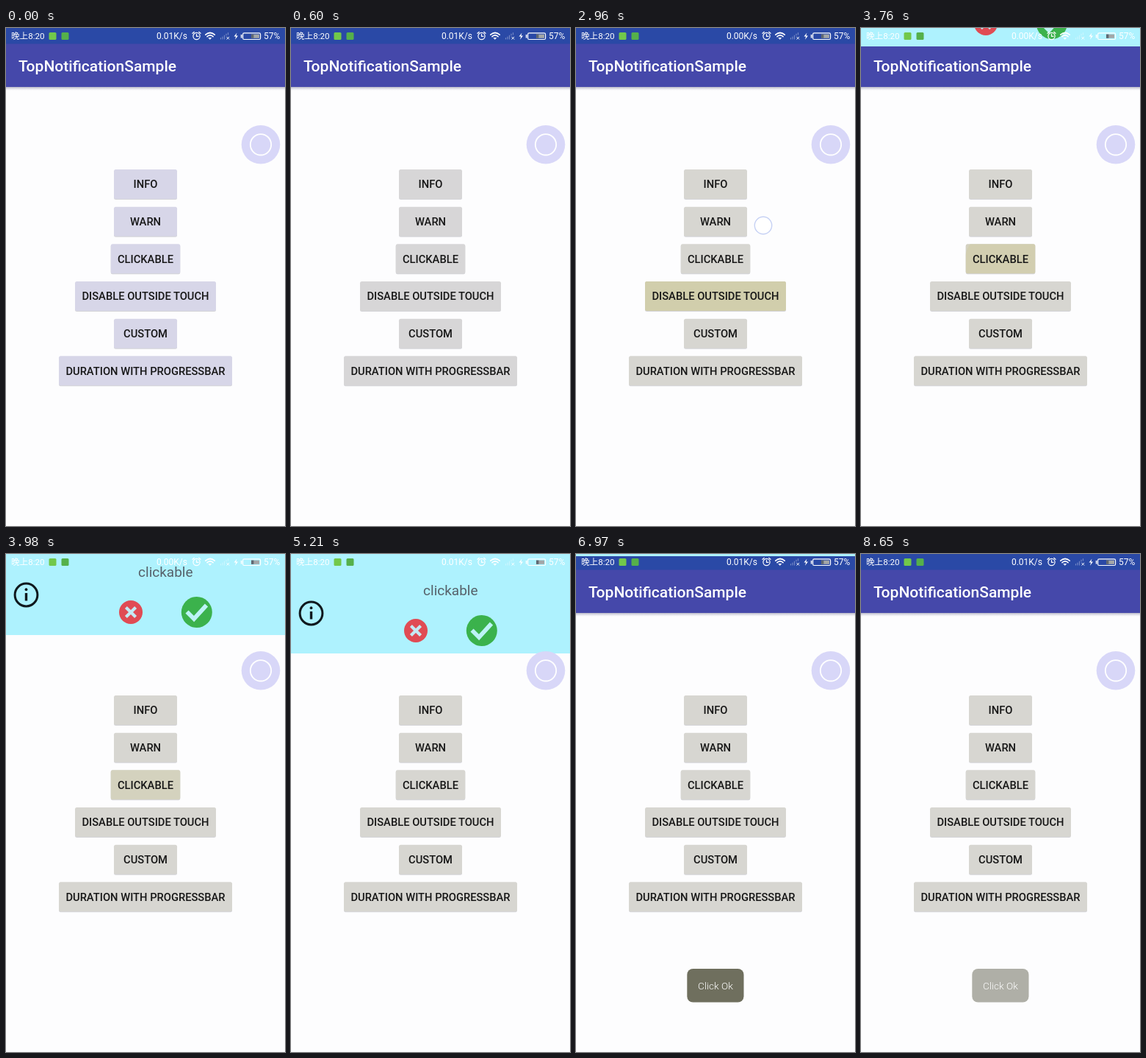
Recreate the animation shown at these times as an HTML page. Size 380 by 676 pixels, loop 8680 ms.

```html
<!DOCTYPE html>
<html lang="en">
<head>
<meta charset="utf-8">
<title>Top notification demo</title>
<style>
  html, body { margin: 0; width: 100%; height: 100%; overflow: hidden; background: #fdfdfe; }
  svg { display: block; width: 380px; height: 676px; font-family: Roboto, "Noto Sans CJK SC", "Noto Sans CJK", sans-serif; }
  .title { font-size: 21px; font-weight: 500; fill: #fff; }
  .label { font-size: 14.72px; font-weight: 500; fill: #161616; text-anchor: middle; }
  .status { font-size: 12px; fill: #fff; }
  .line { fill: none; stroke-linecap: round; stroke-linejoin: round; }
  .mark { fill: none; }
</style>
</head>
<body>
<svg viewBox="0 0 380 676">
  <defs>
    <linearGradient id="shade" x1="0" y1="0" x2="0" y2="1">
      <stop offset="0" stop-color="#8f8fa8" stop-opacity=".65"/>
      <stop offset="1" stop-color="#c8c8d8" stop-opacity="0"/>
    </linearGradient>
  </defs>

  <rect width="380" height="676" fill="#fdfdfe"/>
  <rect y="80" width="380" height="5" fill="url(#shade)"/>
  <rect width="380" height="80" fill="#4548aa"/>
  <rect width="380" height="21.5" fill="#2a49a6"/>
  <text class="title" x="17" y="58.5">TopNotificationSample</text>

  <g id="buttons"></g>

  <g id="banner">
    <rect width="380" height="135" fill="#aef2fe"/>
    <text x="217.3" y="56" font-size="19" fill="#56616a" text-anchor="middle">clickable</text>
    <g stroke="#10191e" fill="#10191e">
      <circle cx="27.5" cy="80.5" r="15.4" fill="none" stroke-width="3"/>
      <circle cx="27.5" cy="73.2" r="1.9" stroke="none"/>
      <path d="M27.5 78V88.5" stroke-width="3.4"/>
    </g>
    <circle cx="170" cy="104" r="16" fill="#e04b54"/>
    <path class="mark" d="M163.4 97.4l13.2 13.2m0-13.2l-13.2 13.2" stroke="#c4eaf4" stroke-width="4.2"/>
    <circle cx="259.8" cy="104" r="21" fill="#3bb24c"/>
    <path class="mark" d="M246.5 103.5l9.5 9.5l17-18.5" stroke="#bdf3f6" stroke-width="5.8"/>
  </g>

  <g class="status">
    <text x="7" y="15" font-size="11.6">晚上8:20</text>
    <rect x="58.5" y="6" width="10" height="10" rx="1.5" fill="#72c84a"/>
    <rect x="75.5" y="6" width="10" height="10" rx="1.5" fill="#55b04a"/>
    <text id="speed" x="247" y="15" text-anchor="end"></text>
    <g class="line" stroke="#fff" stroke-width="1.2">
      <circle cx="259.5" cy="11" r="4.6"/>
      <path d="M259.5 8.3V11.3H262M254 7.3l2.3-2M265 7.3l-2.3-2"/>
      <path d="M271.8 9.2Q278 3.8 284.2 9.2M274 11.6Q278 8.2 282 11.6" stroke-width="1.7"/>
      <path d="M276.3 13.4H279.7L278 15.2Z" fill="#fff" stroke-width=".8"/>
      <path d="M292.5 15V13.5M295 15V12M297.5 15V10M300 10V8M302.5 9V6.5" opacity=".35"/>
      <path d="M300.8 12.2l3 3m0-3l-3 3" stroke-width="1"/>
      <path d="M314.5 6.5l-4 5h2.7l-1.2 4.3l4-5.2h-2.7z" fill="#fff" stroke="none"/>
      <rect x="322.6" y="6.9" width="24" height="8.6" rx="1.8"/>
      <path d="M320.6 9.5V13" stroke-width="1.6"/>
    </g>
    <rect x="334" y="8.6" width="11" height="5.2" fill="#a3a7a8"/>
    <rect x="334" y="8.6" width="3.4" height="5.2" fill="#5f6872"/>
    <text x="351" y="15">57%</text>
  </g>

  <circle cx="347" cy="158.3" r="26.3" fill="#d8d7f8"/>
  <circle cx="347" cy="158.3" r="14.2" fill="none" stroke="#fff" stroke-width="1.8"/>

  <g id="toast">
    <rect x="151.3" y="563" width="77.2" height="45.5" rx="8" fill="#6f6f5e"/>
    <text x="190" y="591" font-size="13.6" font-weight="300" fill="#fff" text-anchor="middle">Click Ok</text>
  </g>

  <circle id="touch" r="11.7" fill="#fff" fill-opacity=".72" stroke="#c6d1f4" stroke-width="1.4"/>
</svg>

<script>
const LOOP = 8680;
const $ = id => document.getElementById(id);

// label, width
const BUTTONS = [
  ["INFO", 86], ["WARN", 86], ["CLICKABLE", 94.5],
  ["DISABLE OUTSIDE TOUCH", 192], ["CUSTOM", 86], ["DURATION WITH PROGRESSBAR", 236]
];

const box = (x, y, w, extra) =>
  `<rect x="${x}" y="${y}" width="${w}" height="40" rx="2.5" ${extra}/>`;

$("buttons").innerHTML = BUTTONS.map(([label, w], i) => {
  const x = 190 - w / 2, y = 192 + i * 50.67;
  return `<clipPath id="clip${i}">${box(x, y, w, "")}</clipPath>
    ${box(x, y + 1, w, 'fill="#b9b9c0" opacity=".6"')}
    ${box(x, y, w, "")}
    <g id="press${i}" clip-path="url(#clip${i})" opacity="0" fill="#d1ceac">
      ${box(x, y, w, 'opacity=".5"')}<circle/></g>
    <text class="label" x="190" y="${y + 25.4}">${label}</text>`;
}).join("");

// button index (or -1), down, up, fade length, start point, end point
const TAPS = [
  { button: 3, down: 2130, up: 3015, fade: 220, from: [202.3, 366.5], to: [255, 268] },
  { button: 2, down: 3440, up: 3560, fade: 590, from: [199, 325], to: [199, 325] },
  { button: -1, down: 6290, up: 6410, fade: 0, from: [262, 106], to: [262, 106] }
];

const part = (t, start, length) => Math.min(1, Math.max(0, (t - start) / length));
const ease = p => (1 - Math.cos(Math.PI * p)) / 2;
const mix = (a, b, p) => a + (b - a) * p;

function drawTaps(t) {
  let shown = false;
  for (const { button, down, up, fade, from, to } of TAPS) {
    if (t >= down && t < up) {
      const p = ease(part(t, down + 60, up - down - 120));
      $("touch").setAttribute("cx", mix(from[0], to[0], p));
      $("touch").setAttribute("cy", mix(from[1], to[1], p));
      shown = true;
    }
    if (button < 0) continue;
    const press = $("press" + button), ripple = press.querySelector("circle");
    press.setAttribute("opacity", part(t, down, 150) * (1 - part(t, up, fade) ** 2));
    ripple.setAttribute("cx", from[0]);
    ripple.setAttribute("cy", from[1]);
    ripple.setAttribute("r", 130 * part(t, down, 700));
  }
  $("touch").setAttribute("visibility", shown ? "visible" : "hidden");
}

function draw(t) {
  $("speed").textContent = t >= 1220 && t < 5210 ? "0.00K/s" : "0.01K/s";

  // buttons settle from lilac to neutral grey
  const blue = Math.round(mix(232, 209, part(t, 30, 770)));
  $("buttons").setAttribute("fill", `rgb(215 214 ${blue})`);
  drawTaps(t);

  const open = ease(part(t, 3616, 510)) - ease(part(t, 6521, 500));
  $("banner").setAttribute("transform", `translate(0 ${Math.round(-135 * (1 - open))})`);

  const rise = part(t, 6440, 400), fade = part(t, 8430, 480);
  $("toast").setAttribute("transform", `translate(0 ${29 * (1 - rise)})`);
  $("toast").setAttribute("opacity", rise * (1 - fade));
}

// labels keep their own colour while the button group changes
const begin = performance.now();
function tick() {
  draw((performance.now() - begin) % LOOP);
  requestAnimationFrame(tick);
}
tick();
</script>
</body>
</html>
```
